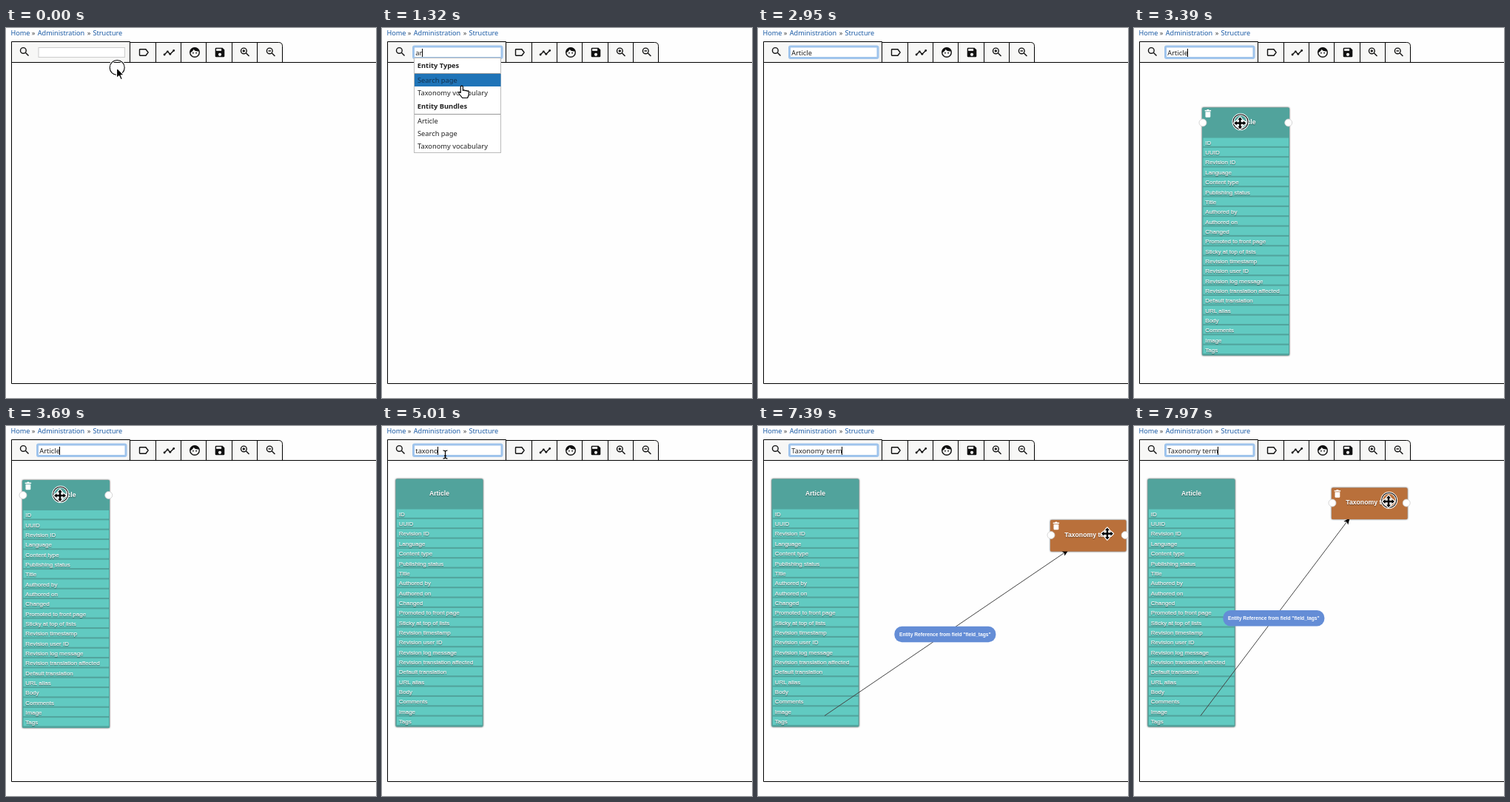
Recreate the animation shown at these times as an HTML page. Size 500 by 500 pixels, loop 8000 ms.

```html
<!DOCTYPE html>
<html lang="en">
<head>
<meta charset="utf-8">
<title>Entity diagram</title>
<style>
  html, body { margin: 0; width: 100%; height: 100%; overflow: hidden; background: #fefefe; }
  svg { display: block; width: 500px; height: 500px; font: 9.3px "Noto Sans", sans-serif; fill: #222; }
  .crumbs { font-size: 9.15px; fill: #1a5aa5; }
  .crumbs .sep { fill: #444; }
  .frame { fill: none; stroke: #000; }
  .tab { fill: #f7f7f6; stroke: #000; }
  .icon { fill: #111; stroke: none; }
  .icon .line { fill: none; stroke: #111; stroke-width: 2; }
  .icon .hole { fill: #f7f7f6; }
  .bold { font-weight: 700; }
  .node { filter: drop-shadow(0 .5px 1.2px rgba(0, 0, 0, .75)); }
  .node text { font: 8px "Liberation Sans", Arial, sans-serif; fill: #fff; stroke: #fff; stroke-width: .2px;
    text-shadow: 0 1px 1px rgba(0, 0, 0, .45); }
  .node .title { font-size: 8.7px; font-weight: 700; text-anchor: middle; stroke: none; }
  .label { font: 700 6.65px "Liberation Sans", Arial, sans-serif; fill: #fff; text-anchor: middle; }
  .pointer { stroke-width: 1.2; stroke-linejoin: round; }
</style>
</head>
<body>
<svg viewBox="0 0 500 500">
  <defs>
    <path id="arrow" d="M0 0V14.3L3.3 11.3 5.6 16.3 7.9 15.3 5.7 10.3H10Z" fill="#000" stroke="#fff"/>
    <path id="hand" d="M-1.6 9V1.3a1.6 1.6 0 0 1 3.2 0V6q1.6-1.2 2.9.3 1.6-.9 2.7.5 2-.6 2.4 1.2v3.5L7.8 16H.8L-4 10q-.6-2.2 1.4-1.8z" fill="#fff" stroke="#000"/>
    <path id="move" d="M0-8 3-4.5H1.2V-1.2H4.5V-3L8 0 4.5 3V1.2H1.2V4.5H3L0 8-3 4.5H-1.2V1.2H-4.5V3L-8 0-4.5-3V-1.2H-1.2V-4.5H-3Z" fill="#000" stroke="#fff" stroke-width="2.4" paint-order="stroke"/>
    <path id="beam" d="M-3-5.5q3 0 3 2v7q0 2-3 2M3-5.5q-3 0-3 2v7q0 2 3 2M-1.5 1.8h3" fill="none" stroke="#000"/>
    <g id="trash" fill="#fff">
      <path d="M0 1.4H2.4L3.2.4H5.2L6 1.4H8.4V2.9H0Z"/>
      <path d="M.8 3.8H7.6V10q0 1.2-1.2 1.2H2Q.8 11.2.8 10Z"/>
    </g>
  </defs>

  <g class="crumbs">
    <text x="6.5" y="10">Home</text><text class="sep" x="34.7" y="10">»</text>
    <text x="42.7" y="10">Administration</text><text class="sep" x="109.7" y="10">»</text>
    <text x="117.5" y="10">Structure</text>
  </g>
  <path class="tab" d="M167.5 46.5V19.5H368.5q5 0 5 5V46.5Z"/>
  <path class="frame" d="M202.5 19.5V46M236.5 19.5V46M270.5 19.5V46M305.5 19.5V46M339.5 19.5V46"/>
  <path class="tab" d="M7.5 46.5V18.5H167.5V46.5Z"/>
  <path class="frame" d="M510 46.5H7.5V480.5H510"/>
  <g id="icons"></g>
  <g id="scene"></g>
  <g id="input">
    <rect id="box" fill="#fff"/>
    <rect id="selection" x="45" y="27.5" width="29" height="11.5" fill="#b3d7fd"/>
    <text id="value" x="45.3" y="36.6"></text>
    <path id="caret" d="M0 28V39" stroke="#000"/>
  </g>
  <g id="overlay"></g>
</svg>
<script>
const LOOP = 8000;
const $ = id => document.getElementById(id);

// Toolbar icons, drawn on a 24 unit grid
const lens = '<circle class="line" cx="9.5" cy="9.5" r="5.5"/><path class="line" d="M14 14 19.7 19.7"/>';
const dot = (x, y, r, cls = '') => `<circle class="${cls}" cx="${x}" cy="${y}" r="${r}"/>`;
const icons = [
  [16.7, 23.8, lens],
  [177.7, 24.6, '<path class="line" stroke-linejoin="round" d="M16 6H5q-1 0-1 1V17q0 1 1 1H16L20.6 12Z"/>'],
  [212, 24.8, '<path class="line" d="M3 16 9 10 14 15 21 8"/>' + dot(3, 16, 2) + dot(9, 10, 2) + dot(14, 15, 2) + dot(21, 8, 2)],
  [246.6, 24.6, dot(12, 12, 9, 'line') + '<path d="M2.5 12.4Q8 11 9.7 6.3 13.500 11 21.500 9.700A9.700 9.700 0 0 0 2.500 12.400Z"/>' + dot(9, 13, 1.3) + dot(15, 13, 1.3)],
  [280.6, 24.6, '<path d="M5 3H17L21 7V19q0 2-2 2H5q-2 0-2-2V5Q3 3 5 3Z"/><path class="hole" d="M5 5H15V9H5Z"/>' + dot(12, 16, 3, 'hole')],
  [314.7, 24.3, lens + '<path class="line" stroke-width="1" d="M7 9.5H12M9.500 7V12"/>'],
  [349.6, 24.3, lens + '<path class="line" d="M7 9.5H12"/>']
];
$('icons').innerHTML = icons.map(([x, y, art]) =>
  `<g class="icon" transform="translate(${x} ${y}) scale(.7)">${art}</g>`).join('');

const fields = ['ID', 'UUID', 'Revision ID', 'Language', 'Content type', 'Publishing status', 'Title',
  'Authored by', 'Authored on', 'Changed', 'Promoted to front page', 'Sticky at top of lists',
  'Revision timestamp', 'Revision user ID', 'Revision log message', 'Revision translation affected',
  'Default translation', 'URL alias', 'Body', 'Comments', 'Image', 'Tags'];
const ROW = 13.34;

const menus = {
  ar: [['Search page', 'Taxonomy vocabulary'], ['Article', 'Search page', 'Taxonomy vocabulary']],
  tax: [['Taxonomy term', 'Taxonomy vocabulary'], ['Taxonomy vocabulary']]
};

// Each step overrides part of the state before it
const HOME = [18.5, 71.5];
const steps = [
  [0, { text: '', caret: 0, focus: 0, cur: ['arrow', 149.500, 53.500], ring: 1, menu: '', hover: -1, select: 0,
        article: null, term: null, active: '' }],
  [140, { cur: ['beam', 140, 33] }],
  [290, { focus: 1, caret: 1, cur: ['beam', 130, 33] }],
  [440, { ring: 0, cur: ['beam', 118, 34] }],
  [590, { text: 'a', cur: null }],
  [740, { text: 'ar' }],
  [1040, { menu: 'ar', cur: ['beam', 116, 34] }],
  [1180, { cur: ['hand', 111, 64], hover: 0 }],
  [1320, { cur: ['hand', 107.8, 78.5] }],
  [1470, { cur: ['hand', 90, 112], hover: 2 }],
  [1610, { cur: ['hand', 82, 125], ring: 1 }],
  [1910, { text: 'Article', menu: '', hover: -1, cur: ['arrow', 82, 125] }],
  [2060, { ring: 0 }],
  [2200, { caret: 0, cur: null }],
  [2350, { caret: 1 }],
  [2950, { caret: 0 }],
  [3100, { article: [232, 127], active: 'article', cur: ['move', 283, 148] }],
  [3240, { ring: 1, caret: 1 }],
  [3390, { article: [92, 107.5], cur: ['move', 143.3, 128.5] }],
  [3540, { article: [48, 86], cur: ['move', 99, 107] }],
  [3680, { article: [22, 73], cur: ['move', 73, 94] }],
  [3830, { article: HOME, cur: ['move', 69.500, 92.500], caret: 0 }],
  [3980, { active: '', ring: 0, cur: ['arrow', 88, 66] }],
  [4120, { cur: ['beam', 85.500, 38.500], ring: 1 }],
  [4270, { select: 1 }],
  [4420, { select: 0, ring: 0, caret: 1, text: 't' }],
  [4560, { text: 'ta' }],
  [4710, { text: 'tax' }],
  [4860, { text: 'taxo' }],
  [5010, { text: 'taxono' }],
  [5160, { text: 'taxonom' }],
  [5310, { text: 'taxonomy' }],
  [5600, { menu: 'tax' }],
  [5750, { cur: ['hand', 92, 47] }],
  [5900, { cur: ['hand', 104, 60] }],
  [6050, { cur: ['hand', 114, 67], hover: 0 }],
  [6200, { cur: ['hand', 117.500, 69.500] }],
  [6350, { ring: 1 }],
  [6500, { text: 'Taxonomy term', menu: '', hover: -1, cur: ['arrow', 117.500, 69.500], ring: 0 }],
  [6640, { term: [395, 127], cur: null }],
  [7240, { cur: ['arrow', 300, 100] }],
  [7390, { cur: ['move', 472, 145.500], active: 'term' }],
  [7530, { ring: 1 }],
  [7680, { term: [358, 113], cur: ['move', 435, 131.500] }],
  [7830, { term: [300, 92], cur: ['move', 377, 110.500] }],
  [7970, { term: [267, 83.5], cur: ['move', 344, 102] }]
];
let last = {};
const states = steps.map(([t, change]) => last = { t, ...last, ...change, t });

function controls(w) {
  const handle = x => `<circle cx="${x}" cy="20.5" r="5" fill="#fff" stroke="#ccc" stroke-width=".8"/>`;
  return '<use href="#trash" x="3.7" y="2"/>' + handle(1) + handle(w - 1.3);
}

function node([x, y], w, h, color, title, titleY, rows, active) {
  return `<g transform="translate(${x} ${y})"><g class="node"><rect width="${w}" height="${h}" rx="1.5" fill="${color}"/>` +
    rows.map((name, i) => {
      const top = 41 + i * ROW;
      return `<rect x="1.5" y="${top}" width="${w - 2.5}" height="11.3" fill="#61cac1"/>` +
        `<text x="4.3" y="${top + 9.300}">${name}</text>`;
    }).join('') +
    `<text class="title" x="${w / 2}" y="${titleY}">${title}</text></g>${active ? controls(w) : ''}</g>`;
}

function edge([x, y]) {
  const x1 = 90, y1 = 391.5, x2 = x + 24.700, y2 = y + 40.500;
  const mx = (x1 + x2) / 2 - 2, my = (y1 + y2) / 2 + 2;
  const turn = Math.atan2(y2 - y1, x2 - x1) * 180 / Math.PI;
  return `<path d="M${x1} ${y1}L${x2} ${y2}" stroke="#444"/>` +
    `<path d="M0 0-9-3.700-7 0-9 3.700Z" fill="#000" transform="translate(${x2} ${y2}) rotate(${turn})"/>` +
    `<rect x="${mx - 68.500}" y="${my - 10.700}" width="137" height="21.400" rx="10" fill="#648dd6"/>` +
    `<text class="label" x="${mx}" y="${my + 2.300}">Entity Reference from field "field_tags"</text>`;
}

function menu(groups, hover) {
  let y = 41, item = 0, out = '';
  groups.forEach((list, g) => {
    out += `<text class="bold" x="47.8" y="${y + 13}">${g ? 'Entity Bundles' : 'Entity Types'}</text>` +
      `<path d="M44 ${y + 20.500}H160" stroke="#999"/>`;
    y += 21;
    for (const name of list) {
      const on = item++ === hover;
      if (on) out += `<rect x="44" y="${y}" width="116.500" height="17" fill="#1f74b8"/>`;
      out += `<text x="48" y="${y + 12}"${on ? ' fill="#12324f"' : ''}>${name}</text>`;
      y += 17;
    }
  });
  return `<rect x="43.5" y="40.5" width="117" height="${y - 40}" fill="#fff" stroke="#bbb"/>${out}`;
}

function pointer([kind, x, y], ring) {
  const cx = x + .7, cy = y - (kind === 'move' ? 1.700 : 0);
  const circle = (color, w) => `<circle cx="${cx}" cy="${cy}" r="10" fill="none" stroke="${color}" stroke-width="${w}"/>`;
  return (ring ? circle('#fff', 3) + circle('#000', 1.1) : '') + `<use class="pointer" href="#${kind}" x="${x}" y="${y}"/>`;
}

function attrs(el, values) {
  for (const key in values) el.setAttribute(key, values[key]);
}

function draw(s) {
  $('scene').innerHTML =
    (s.article ? node(s.article, 118, 335, '#51a39c', 'Article', 22.700, fields, s.active === 'article') : '') +
    (s.term ? edge(s.term) + node(s.term, 102.500, 42.500, '#b9703b', 'Taxonomy term', 22.700, [], s.active === 'term') : '');
  attrs($('box'), s.focus
    ? { x: 42.5, y: 25, width: 119.5, height: 15.5, rx: 1.5, stroke: '#9fc4ec', 'stroke-width': 3 }
    : { x: 44, y: 26.5, width: 116.5, height: 13, rx: 0, stroke: '#ccc', 'stroke-width': 1 });
  $('value').textContent = s.text;
  $('selection').style.display = s.select ? '' : 'none';
  $('caret').style.display = s.caret && !s.select ? '' : 'none';
  const end = s.text ? $('value').getComputedTextLength() : 0;
  $('caret').setAttribute('transform', `translate(${Math.floor(45.3 + end) + .5} 0)`);
  $('overlay').innerHTML = (s.menu ? menu(menus[s.menu], s.hover) : '') + (s.cur ? pointer(s.cur, s.ring) : '');
}

let shown;
const start = performance.now();
function tick() {
  const t = (performance.now() - start) % LOOP;
  const state = states.findLast(s => s.t <= t);
  if (state !== shown) draw(shown = state);
  requestAnimationFrame(tick);
}
tick();
</script>
</body>
</html>
```
